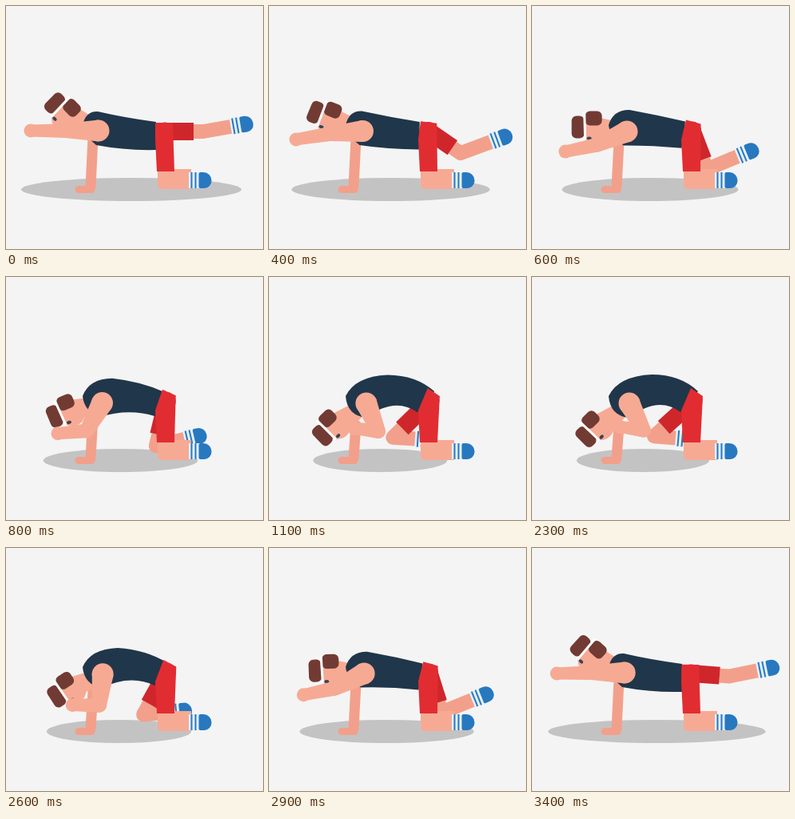
Write an HTML page with a canvas that moves like this. It is 322x304 px and loops after 3500 ms.

```html
<!DOCTYPE html>
<html lang="en">
<head>
<meta charset="utf-8">
<title>Bird dog crunch</title>
<style>
html, body { margin: 0; width: 100%; height: 100%; overflow: hidden; background: #f4f4f4; }
canvas { display: block; width: 322px; height: 304px; }
</style>
</head>
<body>
<canvas></canvas>
<script>
const canvas = document.querySelector('canvas');
const ctx = canvas.getContext('2d');
const ratio = window.devicePixelRatio || 1;
canvas.width = 322 * ratio;
canvas.height = 304 * ratio;

const LOOP = 3500, STEP = 100, FOLD = 1200, HOLD_END = 2300, UNFOLD = 1240;
const SKIN = '#f6aa94', SKIN_FAR = '#f2a08b', NAVY = '#20364a';
const RED = '#e12d32', RED_FAR = '#cf262c', BLUE = '#2878bf', HAIR = '#713b34';

const lerp = (a, b, u) => a + (b - a) * u;
const ease = x => (1 - Math.cos(Math.PI * Math.min(1, x))) / 2;
const foldAt = t => t < HOLD_END ? ease(t / FOLD) : 1 - ease((t - HOLD_END) / UNFOLD);
const radians = degrees => degrees * Math.PI / 180;
const reach = ([x, y], length, degrees) =>
  [x + length * Math.cos(radians(degrees)), y + length * Math.sin(radians(degrees))];

function fill(color, build) {
  ctx.fillStyle = color;
  ctx.beginPath();
  build();
  ctx.fill();
}

const disc = (color, [x, y], rx, ry = rx) =>
  fill(color, () => ctx.ellipse(x, y, rx, ry, 0, 0, 2 * Math.PI));

const polygon = (color, points) =>
  fill(color, () => points.forEach(p => ctx.lineTo(...p)));

function line(color, width, points, cap = 'round') {
  ctx.strokeStyle = color;
  ctx.lineWidth = width;
  ctx.lineCap = cap;
  ctx.lineJoin = 'round';
  ctx.beginPath();
  points.forEach(p => ctx.lineTo(...p));
  ctx.stroke();
}

function taper(color, a, ra, b, rb) {
  const side = Math.atan2(b[1] - a[1], b[0] - a[0]) * 180 / Math.PI + 90;
  polygon(color, [reach(a, ra, side), reach(b, rb, side), reach(b, -rb, side), reach(a, -ra, side)]);
  disc(color, a, ra);
  disc(color, b, rb);
}

function placed([x, y], degrees, draw) {
  ctx.save();
  ctx.translate(x, y);
  ctx.rotate(radians(degrees));
  draw();
  ctx.restore();
}

function foot(ankle, degrees) {
  placed(ankle, degrees, () => {
    fill('#e3f0f9', () => ctx.rect(-1, -10, 16, 20));
    fill(BLUE, () => {
      ctx.rect(1.5, -10, 2, 20);
      ctx.rect(6.5, -10, 2, 20);
      ctx.roundRect(11.5, -10, 16, 20, [2, 10, 9, 2]);
    });
  });
}

function head(u) {
  const drop = u ** 1.6;
  const center = [lerp(73, 78, u ** 3), lerp(132, 188, drop)];
  taper(SKIN, center, 13, [lerp(102, 107, u), lerp(148, 170, drop)], 11);
  placed(center, lerp(45, -45, u), () => {
    disc(SKIN, [6, 6], 16);
    fill(HAIR, () => {
      ctx.roundRect(-24, -13, 16, 28, 6);
      ctx.roundRect(-7, -19, 21, 18, 6);
    });
    line('#fff', 3, [[-8, -18], [-7, 16]], 'butt');
    disc('#3c4454', [-2, 15], 3, 2);
  });
}

function torso(bend) {
  const mix = (ax, ay, bx, by) => [lerp(ax, bx, bend), lerp(ay, by, bend)];
  const curve = (control, end) => ctx.quadraticCurveTo(...control, ...end);
  fill(NAVY, () => {
    ctx.moveTo(96, 149);
    curve(mix(100, 131, 108, 124), mix(115, 132, 150, 122));
    curve(mix(150, 140, 186, 122), mix(188, 145, 208, 143));
    ctx.lineTo(...mix(188, 180, 186, 169));
    curve(mix(150, 181, 158, 148), mix(113, 174, 122, 176));
    curve([98, lerp(162, 174, bend)], [96, 149]);
  });
}

function movingLeg(u, late, swing, hip) {
  const thighAngle = lerp(0, 138, u), shinAngle = lerp(-10, 5, u) - 20 * swing;
  const thigh = lerp(48, 66, late);
  const knee = reach(hip, thigh, thighAngle);
  const ankle = reach(knee, lerp(36, 28, late) + 8 * swing, shinAngle);
  const hem = reach(hip, thigh * 0.75, thighAngle);
  line(SKIN_FAR, 18, [hem, knee, ankle], 'butt');
  foot(ankle, shinAngle);
  disc(RED_FAR, hip, 11.5);
  line(RED_FAR, 22, [hip, hem], 'butt');
}

function reachingArm(u, late, swing) {
  const shoulder = [lerp(116, 122, u), lerp(156, 158, u)];
  const elbow = reach(shoulder, lerp(42, 38, late), lerp(180, 62, late));
  const hand = reach(elbow, lerp(43, 30, late), lerp(180, 188, u) - 16 * swing);
  taper(SKIN, shoulder, 13.5, elbow, 9);
  taper(SKIN, elbow, 9, hand, 7.5);
  disc(SKIN, hand, 8.5);
}

function draw(t) {
  const u = foldAt(t);
  const late = u ** 2.3;
  const swing = Math.sin(Math.PI * u);

  ctx.setTransform(ratio, 0, 0, ratio, 0, 0);
  fill('#f4f4f4', () => ctx.rect(0, 0, 322, 304));
  disc('#c4c3c4', [lerp(157, 139, u), 229.5], lerp(138, 83, u), 14.5);

  // Supporting arm
  line(SKIN_FAR, 13, [[109, lerp(165, 186, late)], [106, 226]]);
  line(SKIN_FAR, 9, [[91, 229.5], [107, 229.5]]);

  movingLeg(u, late, swing, [lerp(199, 202, u), lerp(157, 155, u)]);

  // Kneeling shin
  fill(SKIN, () => ctx.roundRect(190, 204, 42, 25, [0, 0, 0, 5]));
  foot([230, 218], 0);

  head(u);
  torso(late);
  polygon(RED, [
    [lerp(187, 199, u), lerp(146, 139, u)], [lerp(209, 214, u), lerp(146, 149, u)],
    [211, 207], [189, 207], [187, 167]
  ]);
  reachingArm(u, late, swing);
}

const start = performance.now();
function tick() {
  const elapsed = (performance.now() - start) % LOOP;
  draw(Math.floor(elapsed / STEP) * STEP);
  requestAnimationFrame(tick);
}
tick();
</script>
</body>
</html>
```
